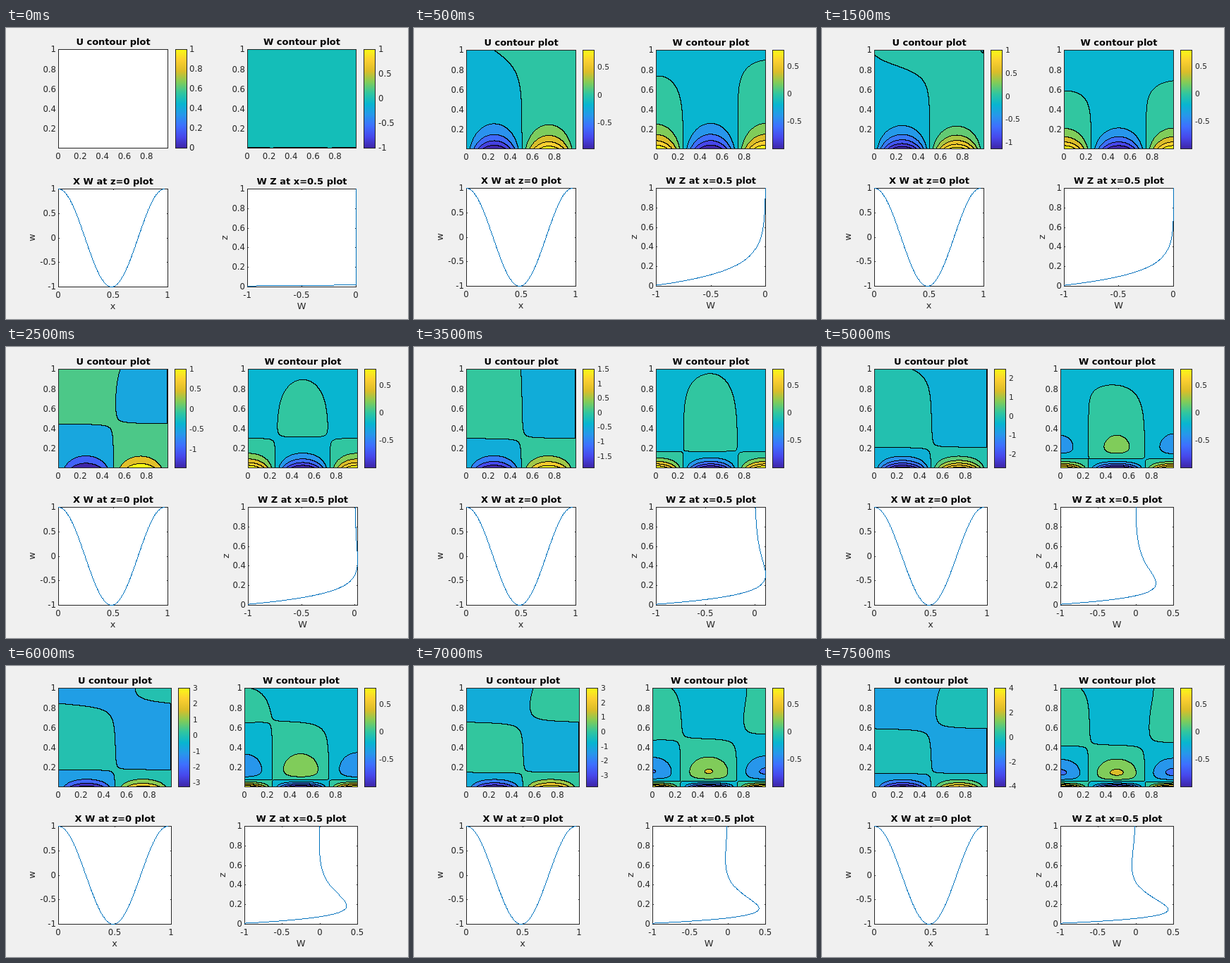
These frames come from a looping animation (570x413 px, 8000 ms). An HTML page with a canvas:

```html
<!DOCTYPE html>
<html lang="en">
<head>
<meta charset="utf-8">
<title>Contour plots</title>
<style>
html, body { margin: 0; width: 100%; height: 100%; overflow: hidden; background: #f0f0f0; }
canvas { display: block; }
</style>
</head>
<body>
<canvas id="stage" width="570" height="413"></canvas>
<script>
const ctx = document.getElementById('stage').getContext('2d');
const TAU = 2 * Math.PI, INK = '#262626', LINE = '#0072bd';
const RATE = .315; // buoyancy frequency times the time between two pictures
const parula = ['3e26a8', '4747eb', '3e6fff', '2797eb', '08b5d0', '31c69f', '81cc59', 'dcbd29', 'fccf30', 'f9fb15']
  .map(h => [0, 2, 4].map(i => parseInt(h.substr(i, 2), 16)));

// Internal wave above a wall forced from t = 0: the inverse Laplace transform of
// exp(-d sqrt(1 + 1/s^2)) / s as a power series in t, with d the scaled height.
function wave(d, t) {
  let a = 1, b = -d / 2, p = t * t / 2, sum = a + b * p;
  for (let j = 0; j < 18; j++) {
    const c = (d * d * a - (j + 1) * (4 * j + 2) * b) / (4 * (j + 1) * (j + 2));
    p *= t * t / ((2 * j + 3) * (2 * j + 4));
    sum += c * p;
    [a, b] = [b, c];
  }
  return sum * Math.exp(-d);
}

// One row of the flow: wave parts of W and U, and the weak drift that breaks the symmetry
function flowRow(z, n) {
  const t = n * RATE, d = TAU * z, e = .001;
  const w = wave(TAU * (z - .01), t);
  return {
    z, w,
    u: (wave(d + e, t) - wave(d - e, t)) / (2 * e),
    driftU: .0006 * (6.5 - n) * z - .06 * w,
    driftW: -.001 - .005 * z,
    tiltW: .012 * (n - 5) * z * (1 - z)
  };
}
const fieldU = (r, x) => Math.sin(TAU * x) * r.u + r.driftU * Math.sin(Math.PI * x) ** 2;
const fieldW = (r, x) => Math.max(-1, Math.cos(TAU * x) * r.w + r.driftW + r.tiltW * (.5 - x));

function colour(t) {
  const p = Math.min(1, Math.max(0, t)) * 9, i = Math.min(8, Math.floor(p));
  return parula[i].map((v, c) => Math.round(v + (parula[i + 1][c] - v) * (p - i)));
}

// Text whose capitals and digits are centred on y
function text(s, x, y, size = 11.7, align = 'center', bold = '') {
  ctx.font = `${bold} ${size}px "DejaVu Sans", sans-serif`;
  ctx.textAlign = align;
  ctx.fillStyle = bold ? '#000' : INK;
  ctx.fillText(s, x, Math.round(y + .365 * size));
}

function frame(b) {
  ctx.strokeStyle = INK;
  ctx.lineWidth = 1;
  ctx.strokeRect(b.x + .5, b.y + .5, b.w, b.h);
}

// Pixel-stepped polyline
function polyline(points) {
  ctx.fillStyle = LINE;
  for (let i = 1; i < points.length; i++) {
    const [x, y] = points[i - 1], dx = points[i][0] - x, dy = points[i][1] - y;
    const steps = Math.ceil(Math.max(Math.abs(dx), Math.abs(dy), 1));
    for (let s = 0; s <= steps; s++) {
      ctx.fillRect(Math.round(x + dx * s / steps), Math.round(y + dy * s / steps), 1, 1);
    }
  }
}

// Filled contours with black lines between bands
function contour(b, rows, field, step, lo, hi) {
  const w = b.w + 1, h = b.h + 1, band = [], img = ctx.createImageData(w, h);
  for (let j = 0; j <= h; j++) {
    for (let i = 0; i <= w; i++) {
      const v = field(rows[Math.min(j, b.h)], Math.min(1, i / b.w));
      band.push(Math.min(Math.round(hi / step), Math.floor(v / step + 1e-6)));
    }
  }
  for (let j = 0; j < h; j++) {
    for (let i = 0; i < w; i++) {
      const k = j * (w + 1) + i, v = band[k];
      const edge = v !== band[k + 1] || v !== band[k + w + 1];
      const rgb = edge ? [0, 0, 0] : colour((Math.max(lo, v * step) - lo) / (hi - lo));
      img.data.set([...rgb, 255], (j * w + i) * 4);
    }
  }
  ctx.putImageData(img, b.x, b.y);
}

function colorbar(b, lo, hi, tick, labelX, size) {
  const grad = ctx.createLinearGradient(0, b.y + b.h, 0, b.y);
  parula.forEach((c, i) => grad.addColorStop(i / 9, `rgb(${c})`));
  ctx.fillStyle = grad;
  ctx.fillRect(b.x, b.y, b.w, b.h);
  frame(b);
  for (let k = Math.ceil(lo / tick - 1e-6); k * tick <= hi + .001; k++) {
    text(String(+(k * tick).toFixed(1)), labelX, b.y + b.h * (hi - k * tick) / (hi - lo), size, 'left');
  }
}

function contourAxes(b, title) {
  frame(b);
  text(title, b.x + b.w / 2 + .5, b.y - 11, 13, 'center', 'bold');
  for (let k = 0; k < 5; k++) {
    text(String(k * 2 / 10), b.x + b.w * k * .2 / .99, b.y + b.h + 11.5);
    const v = (k + 1) * 2 / 10;
    text(String(v), b.x - 3, b.y + b.h * (1 - v) / .99, 11.7, 'right');
  }
}

// Draws the axes and returns the map from data to pixels
function lineAxes(b, title, xName, yName, nameX, xr, xTicks, yr, yTicks) {
  const px = v => b.x + b.w * (v - xr[0]) / (xr[1] - xr[0]);
  const py = v => b.y + b.h * (yr[1] - v) / (yr[1] - yr[0]);
  ctx.fillStyle = '#fff';
  ctx.fillRect(b.x, b.y, b.w, b.h);
  frame(b);
  for (const v of xTicks) {
    const x = Math.round(px(v));
    ctx.fillStyle = INK;
    ctx.fillRect(x, b.y, 1, 2);
    ctx.fillRect(x, b.y + b.h - 1, 1, 2);
    text(String(v), x, b.y + b.h + 11.5);
  }
  for (const v of yTicks) {
    const y = Math.round(py(v));
    ctx.fillStyle = INK;
    ctx.fillRect(b.x, y, 2, 1);
    ctx.fillRect(b.x + b.w - 1, y, 2, 1);
    text(String(v), b.x - 3, y, 11.7, 'right');
  }
  text(title, b.x + b.w / 2 + .5, b.y - 10.5, 13, 'center', 'bold');
  text(xName, b.x + b.w / 2, b.y + b.h + 27, 12.9);
  ctx.save();
  ctx.translate(nameX, b.y + b.h / 2);
  ctx.rotate(-Math.PI / 2);
  text(yName, 0, 0, 12.9);
  ctx.restore();
  return (x, y) => [px(x), py(y)];
}

function draw(n) {
  const first = n === 0, wide = n >= 8;
  const w = wide ? 160 : first ? 154 : 155, left = wide ? 338 : first ? 342 : 343;
  const top = first ? 30 : 31, low = first ? 228 : 227;
  const box = (x, y, bw = w, h = 140) => ({ x, y, w: bw, h });
  const boxU = box(74, top, first ? 155 : w), boxW = box(left, top);
  const barU = box(wide ? 244 : first ? 240 : 239, top, 16), barW = box(first ? 507 : 508, top, 16);
  const labelU = wide ? 265 : 260, labelW = first ? 528 : 529, size = first ? 11.7 : 10.7;

  ctx.fillStyle = '#f0f0f0';
  ctx.fillRect(0, 0, 570, 413);

  let profile = [[-1, .01], [0, .02], [0, 1]];
  if (first) {
    // Fluid at rest
    ctx.fillStyle = '#fff';
    ctx.fillRect(boxU.x, boxU.y, boxU.w, boxU.h);
    ctx.fillStyle = '#14beb8';
    ctx.fillRect(boxW.x, boxW.y, boxW.w, boxW.h);
    ctx.fillStyle = '#000';
    for (const [a, b] of [[0, .21], [.24, .74], [.78, 1]]) {
      ctx.fillRect(boxW.x + a * w, boxW.y + 139, (b - a) * w, 1);
    }
    colorbar(barU, 0, 1, .2, labelU, size);
    colorbar(barW, -1, 1, .5, labelW, size);
  } else {
    const rows = Array.from({ length: 141 }, (_, j) => flowRow(1 - .99 * j / 140, n));
    const peak = -rows[140].u;
    const step = peak < 1.2 ? .2 : peak < 2.9 ? .5 : 1;
    const hi = step * Math.floor(peak / step), range = hi + peak;
    contour(boxU, rows, fieldU, step, -peak, hi);
    contour(boxW, rows, fieldW, .2, -.995, .8);
    colorbar(barU, -peak, hi, range < 3.6 ? .5 : range < 7.2 ? 1 : 2, labelU, size);
    colorbar(barW, -.995, .8, .5, labelW, size);
    profile = rows.map(r => [-r.w, r.z]);
  }
  contourAxes(boxU, 'U contour plot');
  contourAxes(boxW, 'W contour plot');

  const toX = lineAxes(box(74, low, boxU.w, 139), 'X W at z=0 plot', 'x', 'w', 35.5,
    [0, 1], [0, .5, 1], [-1, 1], [-1, -.5, 0, .5, 1]);
  polyline(Array.from({ length: 98 }, (_, i) => toX(i / 100, Math.cos(TAU * i / 97))));

  const xMax = n < 9 ? Math.max(0, ...profile.map(p => p[0])) : .5;
  const toZ = lineAxes(box(left, low, w, 139), 'W Z at x=0.5 plot', 'W', 'z', wide ? 306 : first ? 309 : 310.5,
    [-1, xMax], [-1, -.5, 0, .5].filter(v => v <= xMax), [0, 1], [0, .2, .4, .6, .8, 1]);
  polyline(profile.map(p => toZ(...p)));
}

const start = performance.now();
let shown = -1;
function tick() {
  const n = Math.floor((performance.now() - start) % 8000 / 500);
  if (n !== shown) draw(shown = n);
  requestAnimationFrame(tick);
}
tick();
</script>
</body>
</html>
```
